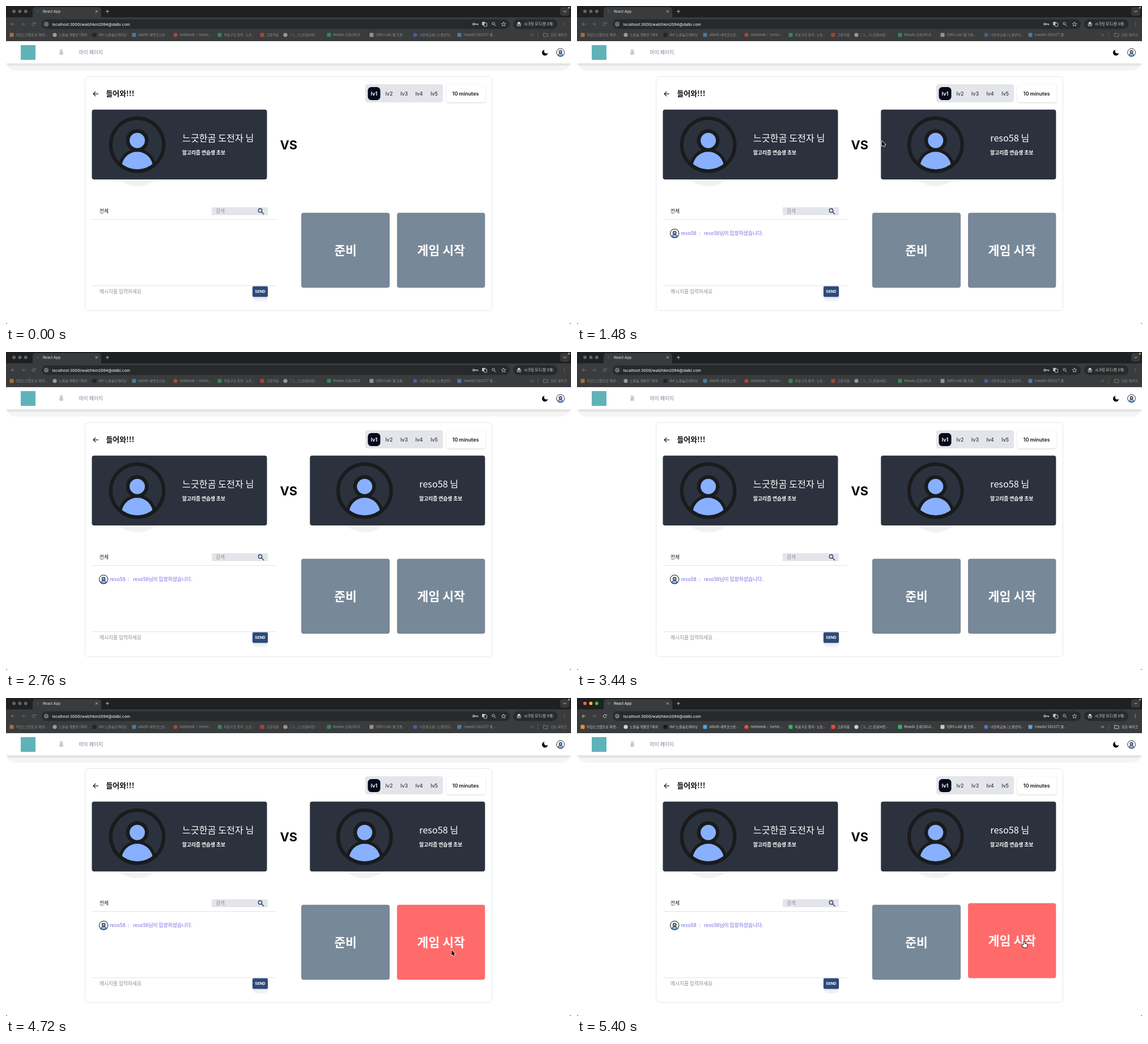
Animation, 997 px wide and 561 px high, one loop 5920 ms. Source, as an HTML page with a canvas:

```html
<!DOCTYPE html>
<html lang="ko">
<head>
<meta charset="utf-8">
<title>React App</title>
<style>
html, body { margin: 0; width: 100%; height: 100%; overflow: hidden; background: #fff; }
canvas { display: block; width: 997px; height: 561px; }
</style>
</head>
<body>
<canvas id="stage"></canvas>
<script>
const W = 997, H = 561, LOOP = 5920;
const KR = '"Noto Sans CJK KR", "Noto Sans CJK", sans-serif';
const EN = 'Inter, "Noto Sans CJK KR", sans-serif';
const USER = 'reso58';
const INK = '#191b1d', BLUE = '#88b0ff', VIOLET = '#726de4', GRAY = '#8c9098';

const JOIN = 600, NAMED = 680, READY = 3920, FOCUS = 4880;

const canvas = document.getElementById('stage');
const ratio = window.devicePixelRatio || 1;
canvas.width = W * ratio;
canvas.height = H * ratio;
const g = canvas.getContext('2d');
g.scale(ratio, ratio);

function box(x, y, w, h, r, fill, stroke) {
  g.beginPath();
  g.roundRect(x, y, w, h, r);
  if (fill) { g.fillStyle = fill; g.fill(); }
  if (stroke) { g.strokeStyle = stroke; g.lineWidth = 1; g.stroke(); }
}

function dot(x, y, r, fill) {
  g.beginPath();
  g.arc(x, y, r, 0, Math.PI * 2);
  g.fillStyle = fill;
  g.fill();
}

function ring(x, y, r, width, color, from = 0, to = Math.PI * 2) {
  g.beginPath();
  g.arc(x, y, r, from, to);
  g.strokeStyle = color;
  g.lineWidth = width;
  g.stroke();
}

// Draws a polyline from a flat list of coordinates.
function line(color, width, ...p) {
  g.beginPath();
  for (let i = 0; i < p.length; i += 2) g.lineTo(p[i], p[i + 1]);
  g.strokeStyle = color;
  g.lineWidth = width;
  g.stroke();
}

// The y value is the middle of the glyphs.
function text(s, x, y, size, color, weight = 400, family = KR, align = 'left') {
  g.font = `${weight} ${size}px ${family}`;
  g.textAlign = align;
  g.fillStyle = color;
  g.fillText(s, x, y + size * 0.37);
}

function shaded(blur, dy, color, draw) {
  g.save();
  g.shadowColor = color;
  g.shadowBlur = blur * ratio;
  g.shadowOffsetY = dy * ratio;
  draw();
  g.restore();
}

function lens(x, y, r, color, width) {
  ring(x, y, r, width, color);
  line(color, width, x + r * 0.7, y + r * 0.7, x + r * 2.1, y + r * 2.1);
}

function avatar(x, y, scale) {
  g.save();
  g.translate(x, y);
  g.scale(scale, scale);
  g.save();
  g.beginPath();
  g.arc(0, 0, 48, 0, Math.PI * 2);
  g.clip();
  dot(0, 40, 33, INK);
  g.beginPath();
  g.arc(0, 0, 43.5, 0, Math.PI * 2);
  g.clip();
  dot(0, 40, 27.6, BLUE);
  g.restore();
  dot(0, -7.5, 20, INK);
  dot(0, -7.5, 13.5, BLUE);
  ring(0, 0, 46.8, 6.2, INK);
  g.restore();
}

const bookmarks = [
  [10, '#e8912d', "타입스크립트로 화면..."],
  [86, '#d6d8da', "노을숲 개발반 7회차"],
  [156, '#101820', "dvt-노을숲트레이닝"],
  [226, '#4fa3d8', "ulbeth 새싹코스반..."],
  [299, '#e8503a', "notebook :: 'sortin..."],
  [377, '#35b36b', "자료구조 정리 : 노트..."],
  [452, '#e04a3c', "고운마음"],
  [493, '#d0d0d0', "○(._.)느린글씨방..."],
  [570, '#35b36b', "Rowdo 조회(SELE..."],
  [645, '#c8c8c8', "[QRS-Lab] 웹 프론..."],
  [722, '#4d78d0', "나란히교실 | 노을언덕..."],
  [800, '#5aa0e0', "[rowdo] SELECT 결..."]
];

function browser(focused) {
  const soft = focused ? '#d4d5d6' : '#929394';
  const icon = focused ? '#cfd0d1' : '#7f8081';
  const tint = focused ? 1 : 0.62;

  box(0, 0, W, 21, 0, '#1f2022');
  box(47, 2, 121, 24, 5, '#3a3b3c');
  box(0, 20, W, 42, 0, '#3a3b3c');
  ['#ff5f57', '#febc2e', '#28c840'].forEach((c, i) =>
    dot(14 + i * 10.4, 9.5, 3, focused ? c : '#626365'));

  g.globalAlpha = tint;
  dot(56, 9.6, 2.8, '#2f5966');
  g.globalAlpha = 1;
  text('React App', 65, 9.7, 6.3, focused ? '#f0f0f0' : '#d2d3d4', 500, EN);
  line('#c8c9ca', 0.9, 157.8, 7.6, 161.8, 11.6);
  line('#c8c9ca', 0.9, 161.8, 7.6, 157.8, 11.6);
  line('#c8c9ca', 0.9, 176, 9.6, 182, 9.6);
  line('#c8c9ca', 0.9, 179, 6.6, 179, 12.6);
  box(978, 2, 16, 15, 4, '#38393a');
  line('#d8d9da', 1, 983.6, 8.4, 986, 10.8, 988.4, 8.4);
  dot(993.5, 3, 1.8, '#d98a2b');

  // Navigation
  line(icon, 0.9, 15, 32, 9, 32);
  line(icon, 0.9, 11.8, 29.2, 9, 32, 11.8, 34.8);
  line('#707172', 0.9, 27, 32, 33, 32);
  line('#707172', 0.9, 30.2, 29.2, 33, 32, 30.2, 34.8);
  ring(49, 32, 2.7, 0.9, icon, 0.4, 5.6);
  line(icon, 0.9, 52, 28.8, 52, 31, 49.8, 31);

  // Address field
  box(63, 23.5, 826, 17, 8.5, '#28292a');
  dot(71, 32, 5.5, '#3a3b3c');
  ring(71, 32, 2.8, 0.8, '#d0d1d2');
  line('#d0d1d2', 0.8, 71, 31.5, 71, 33.6);
  text('localhost:3000/wait/hkm2094@dalbi.com', 81.5, 32, 6.8, '#e4e5e6', 500, EN);
  const tool = '#c0c1c2';
  ring(825.4, 32, 1.7, 1.2, tool);
  line(tool, 1.3, 827, 32, 832.5, 32, 832.5, 33.8);
  box(840, 28, 5.5, 6, 1, tool);
  box(843.5, 30, 5, 6, 1, '#28292a', tool);
  lens(860, 31, 2.2, tool, 1);
  g.beginPath();
  for (let i = 0; i < 10; i++) {
    const a = i * Math.PI / 5 - Math.PI / 2, r = i % 2 ? 1.8 : 4;
    g.lineTo(878 + r * Math.cos(a), 32.2 + r * Math.sin(a));
  }
  g.closePath();
  g.strokeStyle = tool;
  g.lineWidth = 0.9;
  g.stroke();

  box(895, 23.5, 78, 17, 8.5, '#28292a');
  box(903, 28.3, 4.4, 3, 1, '#d8d9da');
  line('#d8d9da', 0.9, 901, 31.8, 909.4, 31.8);
  ring(903.4, 34.3, 1.3, 0.8, '#d8d9da');
  ring(907, 34.3, 1.3, 0.8, '#d8d9da');
  text('시크릿 모드(창 3개)', 914, 32, 6.4, '#dddede', 500);
  for (let i = -1; i < 2; i++) dot(985.3, 32 + i * 2.6, 0.7, icon);

  // Bookmarks
  bookmarks.forEach(([x, color, label], i) => {
    g.globalAlpha = tint;
    if (i % 3 === 1) dot(x, 51, 3.6, color);
    else box(x - 3.5, 47.5, 7, 7, 1, color);
    g.globalAlpha = 1;
    text(label, x + 7.2, 51, 6, soft);
  });
  for (const x of [925, 928]) line(icon, 0.8, x, 49, x + 2, 51, x, 53);
  line('#5c5d5e', 0.8, 938.5, 46, 938.5, 56);
  line(icon, 0.9, 948.5, 54, 948.5, 48, 951, 48, 952, 49, 956, 49, 956, 54, 948.5, 54);
  text('모든 북마크', 961, 51, 6, soft);
}

function header() {
  box(2, 98, 993, 16, [0, 0, 14, 14], '#f5f5f5');
  shaded(5, 1.5, 'rgba(0,0,0,.2)', () => box(0, 62, W, 39.5, 0, '#fff'));
  box(26, 69, 26, 26, 0, '#5fb3b8');
  text('홈', 93.5, 81.5, 8.8, '#7c8594');
  text('마이 페이지', 128.5, 81.5, 8.8, '#7c8594');
  dot(951, 82.2, 5.2, '#070d1e');
  dot(953.6, 79.6, 4.2, '#fff');
  avatar(978.5, 82, 0.148);
}

function card(x, face, label, name) {
  dot(face, 269, 49, '#f2f2f2');
  box(x, 182.8, 309, 123.3, 4, '#2c323d');
  avatar(face, 244.7, 1);
  text(name, label, 233.3, 16.2, '#fff', 500);
  text('알고리즘 연습생 초보', label, 259, 8.7, '#fff', 700);
}

function room(t) {
  box(139.5, 124.5, 718, 413, 6, '#fff', '#e6e7eb');
  line('#111', 1.2, 163, 155, 154, 155);
  line('#111', 1.2, 158.2, 150.8, 154, 155, 158.2, 159.2);
  text('들어와!!!', 176.5, 154.3, 12.9, '#0c0c0e', 700);

  box(634, 138, 137, 32, 4, '#e4e5ea');
  box(638.5, 143, 22, 23, 6, '#050b1c');
  for (let i = 0; i < 5; i++)
    text('lv' + (i + 1), 649.5 + i * 26.5, 154.4, 8.9, i ? '#30343c' : '#fff', i ? 500 : 700, EN, 'center');
  shaded(2.5, 0.7, 'rgba(0,0,0,.18)', () => box(777, 138.5, 69, 31.5, 4, '#fff'));
  text('10 minutes', 811, 154.4, 9, '#15171c', 600, EN, 'center');

  card(151.5, 231.6, 311, '느긋한곰 도전자 님');
  text('VS', 498.7, 245.3, 21.8, '#08080a', 700, EN, 'center');
  if (t >= JOIN) card(536.3, 632.8, 729.3, t >= NAMED ? USER + ' 님' : '님');
}

function chat(t) {
  text('전체', 165, 361.3, 8.8, '#202226', 500);
  box(363, 355, 99, 14, 1, '#e3e5e9');
  text('검색', 370, 361.5, 8.8, GRAY);
  lens(448.5, 360.7, 3.2, '#263d6b', 1.4);
  line('#e2e3e5', 1, 152, 376.5, 476, 376.5);
  line('#e2e3e5', 1, 152, 493.5, 476, 493.5);
  text('메시지를 입력하세요', 165, 503.5, 8.7, GRAY);

  box(436, 500, 26, 21, 6, '#f3f3f4');
  shaded(3, 1, 'rgba(0,0,0,.22)', () => box(435, 494.5, 27, 18.5, 2, '#2b4a7b'));
  text('SEND', 448.5, 503.4, 6.7, '#fff', 700, EN, 'center');

  if (t < JOIN) return;
  const named = t >= NAMED;
  avatar(172.2, 401.2, 0.165);
  if (named) text(USER, 183, 401, 8.9, VIOLET, 500);
  text(':', named ? 215 : 185.5, 401, 8.8, VIOLET, 500);
  text(USER + '님이 입장하셨습니다.', named ? 224 : 195, 401, 8.8, VIOLET, 500);
}

const clamp = v => Math.max(0, Math.min(1, v));
const ease = v => v * v * (3 - 2 * v);

function buttons(t) {
  const lift = 2.7 * ease(clamp((t - FOCUS) / 200));
  box(521, 364.7, 156, 132.3, 4, '#778899');
  text('준비', 599, 431, 21.6, '#fff', 700, KR, 'center');
  box(690, 364.7 - lift, 155.3, 132.3, 4, t >= READY ? '#ff6b6b' : '#778899');
  text('게임 시작', 767.7, 431 - lift, 21.6, '#fff', 700, KR, 'center');
}

// Pointer stops: time, x, y.
const sweep = [[1480, 538, 238], [1760, 522, 352], [2040, 491.7, 461], [2120, 491.7, 461], [2440, 640, 565]];
const enter = [[4600, 850, 562], [4720, 786.3, 445], [4840, 786.3, 445], [5040, 789, 429.5]];

function along(stops, t) {
  const last = stops[stops.length - 1];
  if (t < stops[0][0]) return null;
  for (let i = 1; i < stops.length; i++) {
    const [t0, x0, y0] = stops[i - 1], [t1, x1, y1] = stops[i];
    if (t < t1) {
      const k = ease((t - t0) / (t1 - t0));
      return [x0 + (x1 - x0) * k, y0 + (y1 - y0) * k];
    }
  }
  return [last[1], last[2]];
}

const arrow = new Path2D('M0 0V9.2L2.1 7.3L3.5 10.4L5.1 9.7L3.8 6.7H6.6Z');
const hand = new Path2D('M-.9 .9Q0 -.4 .9 .9V4L4.6 4.8Q5.7 5.2 5.4 6.8L4.6 10.4H-.7L-3.7 6.8Q-3.9 5.2 -2.4 5.7L-.9 6.8Z');

function pointer(t) {
  const at = t < 3000 ? along(sweep, t) : along(enter, t);
  if (!at) return;
  const grab = t >= FOCUS;
  const shape = grab ? hand : arrow;
  g.save();
  g.translate(...at);
  g.lineJoin = 'round';
  g.lineWidth = grab ? 1.8 : 1.4;
  g.strokeStyle = grab ? '#111' : '#fff';
  g.stroke(shape);
  g.fillStyle = grab ? '#fff' : '#000';
  g.fill(shape);
  g.restore();
}

// Dark desktop showing past the rounded window corners.
function corners() {
  g.fillStyle = '#444';
  for (const [x, side] of [[0, 1], [W, -1]]) {
    g.beginPath();
    g.moveTo(x, H);
    g.lineTo(x, H - 3.5);
    g.quadraticCurveTo(x, H, x + side * 3.5, H);
    g.fill();
  }
}

function frame(now) {
  const t = now % LOOP;
  box(0, 0, W, H, 0, '#fff');
  header();
  browser(t >= FOCUS);
  room(t);
  chat(t);
  buttons(t);
  corners();
  pointer(t);
}

const start = performance.now();
function tick() {
  frame(performance.now() - start);
  requestAnimationFrame(tick);
}
tick();
</script>
</body>
</html>
```
